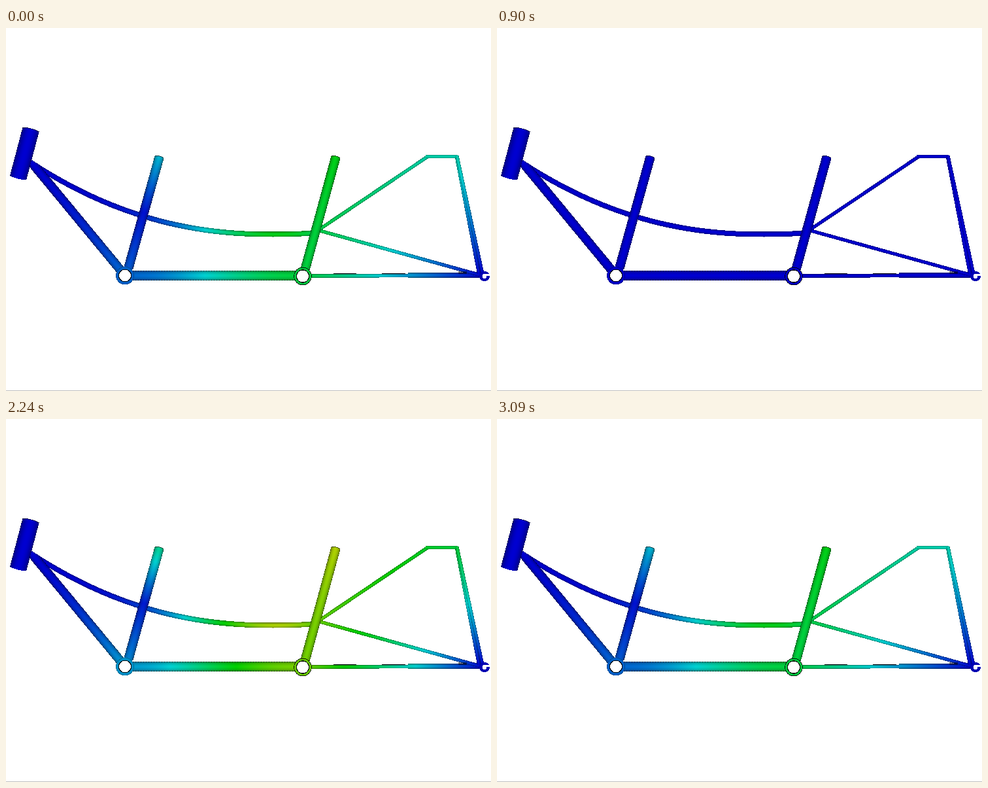
A matplotlib script for the animation above (3.17 s loop, 742x555 px).

```python
import numpy as np
import matplotlib.pyplot as plt
from matplotlib.animation import FuncAnimation

W, H, DPI = 742, 555, 100
LOOP_MS, TICK_MS = 3170, 10
Y, X = np.mgrid[0:H, 0:W].astype(float)

value = np.zeros((H, W))           # displacement magnitude, 0..1
shade = np.zeros((H, W))           # brightness of the surface
solid = np.zeros((H, W), bool)     # pixels covered by the frame


def paint(mask, field, light):
    value[mask] = np.broadcast_to(field, (H, W))[mask]
    shade[mask] = np.broadcast_to(light, (H, W))[mask]
    solid[mask] = True


def ramp(start, end, power=1):
    return lambda s: start + (end - start) * s ** power


def ease(start, end):
    return lambda s: start + (end - start) * s * s * (3 - 2 * s)


def round_light(q):
    return 0.82 - 0.34 * np.clip(q * q, 0, 1)


def tube(start, end, half, field, dome=0, clip=True):
    """Shaded straight tube; field maps 0..1 along it to displacement."""
    (x0, y0), (x1, y1) = start, end
    length = np.hypot(x1 - x0, y1 - y0)
    ux, uy = (x1 - x0) / length, (y1 - y0) / length
    along = (X - x0) * ux + (Y - y0) * uy
    q = ((Y - y0) * ux - (X - x0) * uy) / half
    bulge = dome * np.sqrt(np.clip(1 - q * q, 0, 1))
    mask = (np.abs(q) <= 1) & (along >= -bulge) & (along <= length + bulge) & clip
    paint(mask, field(np.clip(along / length, 0, 1)), round_light(q))
    if half > 5:                   # broken dark outline on the wide tubes
        rim = (np.abs(q) > 1 - 0.8 / half) & ((X + 2 * Y) % 4 < 1)
        shade[mask & rim] *= 0.2
    if dome:
        shade[mask & (along < 0.9 - bulge)] *= 0.4


def ring(cx, cy, inner, outer, field, rim_light):
    r = np.hypot(X - cx, Y - cy)
    light = np.where(r < inner + 1.2, 0.1, np.where(r > outer - 0.9, rim_light, 0.78))
    paint((r >= inner) & (r <= outer), field, light)
    solid[r < inner] = False


def rainbow(v):
    r = np.clip(4 * v - 2, 0, 1)
    g = np.clip(2 - np.abs(4 * v - 2), 0, 1)
    b = np.clip(2 - 4 * v, 0, 1)
    return np.stack([r, g, b], axis=-1)


def build_frame():
    # rear triangle
    tube((466, 378.5), (726, 378), 2.7, ramp(.82, .01))
    tube((615, 377.5), (726, 377.5), 3.5, ramp(.37, .01))
    paint((np.abs(Y - 375) < 0.6) & (X > 500) & (X < 612) & ((X - 500) % 75 < 36),
          0, 0.05)
    tube((480, 309.5), (724, 377), 2.7, ramp(.82, .02, 1.15))
    tube((478, 308), (644, 196.5), 2.7, ramp(.82, .6))
    tube((642, 196), (690, 196), 2.7, ramp(.6, .57))
    for top_x, foot_x in ((688.5, 723), (689.5, 728.5)):
        tube((top_x, 195), (foot_x, 375), 2.6, ramp(.57, .01, 1.2))
    paint((np.abs(Y - 373.5) < 1.6) & (X > 691) & (X < 705) & ((X + Y) % 2 == 0),
          0, 0.05)

    # dropout
    r = np.hypot(X - 731.5, Y - 379)
    slot = (X > 732) & (np.abs(Y - 377) < 1.6)
    paint((r > 3.4) & (r < 7.8) & ~slot, 0, 0.7)
    solid[r <= 3.4] = False

    # curved top tube
    curve = 315 - 111 * (np.abs(408 - X) / 372) ** 2.2
    q = (Y - curve) / np.hypot(1, np.gradient(curve, axis=1)) / 4
    paint((np.abs(q) <= 1) & (X > 33) & (X < 470),
          0.94 * np.exp(-((X - 415) / 140) ** 2), round_light(q))

    # main tubes
    tube((37, 203), (176, 371), 7, ramp(0, .24, 1.8), clip=Y > curve - 4)
    tube((192, 378), (444, 378), 7.5, ease(.25, .85))
    tube((234, 197), (187, 366), 7.2,
         lambda s: .04 + np.where(s < .5, .78, .33) * np.abs(s - .5), dome=2)
    tube((504, 197), (457.5, 367), 7.2, lambda s: .85 + .1 * (1 - s) ** 2, dome=2)
    tube((37.5, 155), (18.2, 228), 13, ramp(0, 0), dome=2)

    # bottom brackets
    ring(181.5, 378, 8.8, 14, .24, rim_light=.6)
    ring(453.5, 379, 9, 13.8, .84, rim_light=.12)


def render(amplitude):
    image = np.ones((H, W, 3))
    lit = rainbow(value * amplitude) * shade[..., None]
    image[solid] = lit[solid]
    image[H - 1] = 0.75
    return np.uint8(255 * image)


def change_times():
    """Bursts of three or four quick steps, each followed by a short hold."""
    times, start = [], 70
    for count in (3, 3, 4, 4, 3, 4, 4, 3, 4):
        times += [start + 76 * step for step in range(count)]
        start += 95 * count + 16
    return np.round(times, -1)


build_frame()
fig = plt.figure(figsize=(W / DPI, H / DPI), dpi=DPI, facecolor="white")
poses = [fig.figimage(render(k / 4), origin="upper") for k in range(5)]
changes = change_times()


def update(frame):
    step = np.searchsorted(changes, frame * TICK_MS, side="right")
    phase = (step - 2) % 8
    level = min(phase, 8 - phase)      # triangle wave between rest and full load
    for k, pose in enumerate(poses):
        pose.set_visible(k == level)
    return poses


update(0)
anim = FuncAnimation(fig, update, frames=LOOP_MS // TICK_MS, interval=TICK_MS,
                     repeat=True, repeat_delay=0, blit=False)
plt.show()
```
